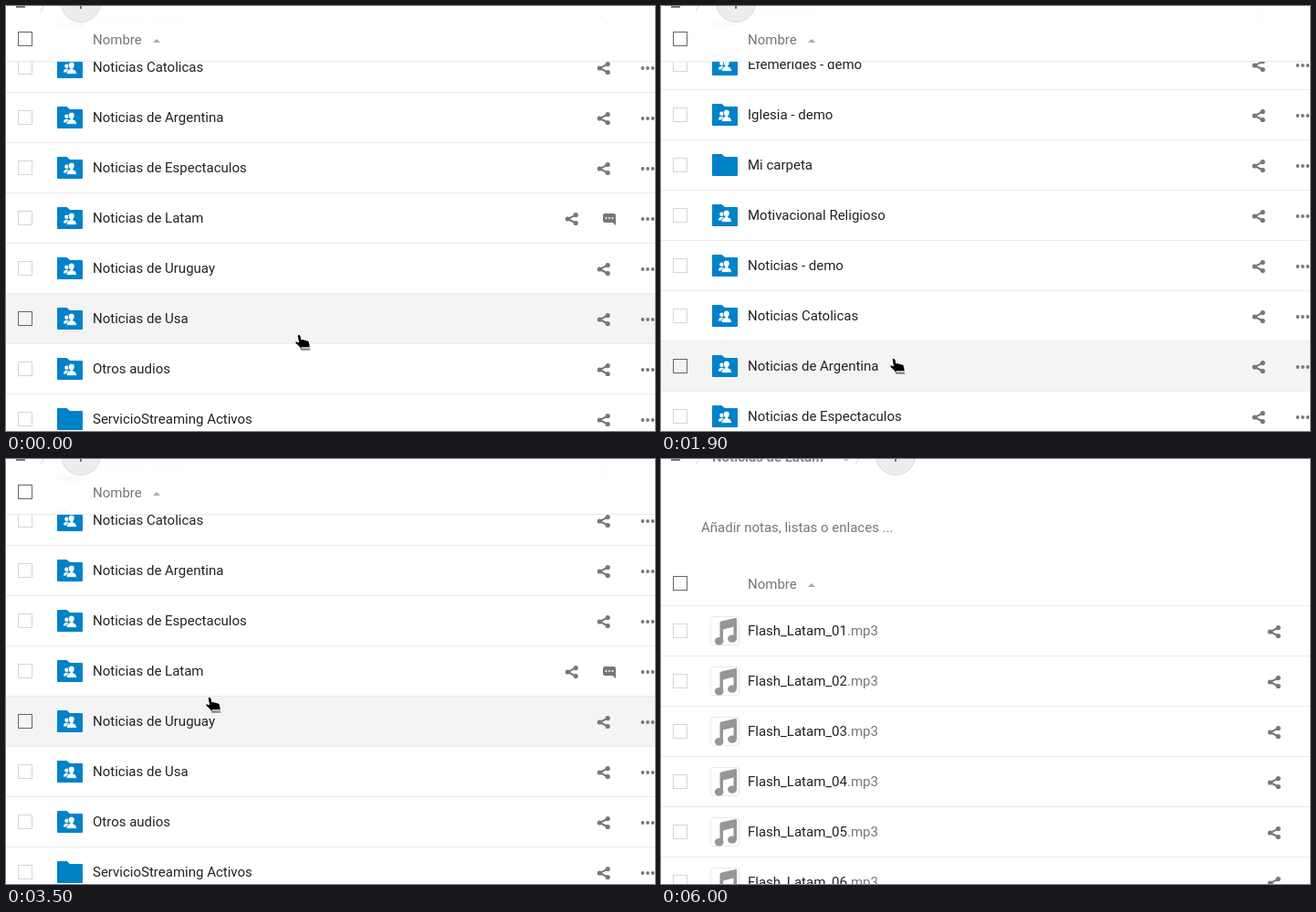
An HTML page that plays this animation: 711x465 px, repeating every 6.5 s.

```html
<!DOCTYPE html>
<html lang="es">
<head>
<meta charset="utf-8">
<title>Lista de archivos</title>
<style>
  html, body { margin: 0; width: 100%; height: 100%; overflow: hidden; background: #fff; }
  svg { display: block; }
  text { font: 15px Roboto, Arial, sans-serif; fill: #222; white-space: pre; }
  .soft { fill: #767676; }
  .crumb { font-weight: bold; fill: #888; }
  .icon { fill: #777; }
  .line { fill: #ebebeb; }
  .box { fill: #fff; stroke: #d6d6d6; }
  .row .back { fill: none; }
  .row.on .back { fill: #f4f4f4; }
  .row.on .box, .head .box { stroke: #666; }
  .row.on .box { fill: none; }
</style>
</head>
<body>
<svg width="711" height="465" viewBox="0 0 711 465">
  <defs>
    <path id="folder" fill="#0082c9" d="M57-12H66.500L70-9H83Q84-9 84-8V11Q84 12 83 12H57Q56 12 56 11V-11Q56-12 57-12Z"/>
    <g id="people">
      <circle cx="66.500" cy="-1.200" r="2.300" fill="#fff"/>
      <path fill="#fff" d="M63 5.500Q63 1.800 66.500 1.800T70 5.500Z"/>
      <path fill="#fff" stroke="#0082c9" stroke-width=".8" d="M66.300 7.400Q66 3 70.300 2C66.800-2 68.500-5.800 71.800-5.800S76.500-2 73.300 2Q77.600 3 77.300 7.400Z"/>
    </g>
    <g id="share" class="icon">
      <path d="M4.200-4.400L-4.700 0L4.200 4.500" fill="none" stroke="#777" stroke-width="2"/>
      <circle cx="-4.700" r="2.600"/><circle cx="4.200" cy="-4.400" r="2.600"/><circle cx="4.200" cy="4.500" r="2.600"/>
    </g>
    <g id="more" class="icon">
      <circle cx="697.500" cy="1" r="1.900"/><circle cx="703" cy="1" r="1.900"/><circle cx="708.500" cy="1" r="1.900"/>
    </g>
    <g id="comment">
      <path class="icon" d="M656-5H666Q668-5 668-3V8L664.500 5H656Q654 5 654 3V-3Q654-5 656-5Z"/>
      <g fill="#fff"><circle cx="657.500" r="1"/><circle cx="661" r="1"/><circle cx="664.500" r="1"/></g>
    </g>
    <g id="note">
      <rect x="54.500" y="-15.500" width="31" height="31" rx="2.500" fill="#fff" stroke="#e9e9e9"/>
      <path fill="#969696" d="M64.500-8.500Q64.500-10 66-10.500L81.500-14Q83-14.300 83-13V8.500H79.500V-4.500L68-1.500V11.500H64.500Z"/>
      <ellipse cx="63.700" cy="11.300" rx="4.800" ry="4.200" fill="#969696"/>
      <ellipse cx="78" cy="8.600" rx="5" ry="4.200" fill="#969696"/>
    </g>
    <g id="head" class="head">
      <rect class="box" x="13.500" y="-8.500" width="15" height="15"/>
      <text class="soft" x="95" y="5">Nombre</text>
      <path fill="#aaa" d="M161 3L165-1L169 3Z"/>
      <rect class="line" y="23" width="711" height="1"/>
    </g>
    <g id="home">
      <rect x="11" y="0" width="10" height="2" fill="#777"/>
      <path d="M38 6L43-3" stroke="#d4d4d4"/>
    </g>
    <g id="add">
      <circle cy="-4" r="21.500" fill="#ededed" stroke="#d9d9d9"/>
      <rect x="-1" y="-4" width="2" height="7" fill="#777"/>
    </g>
    <g id="ring" fill="none" stroke-width="2">
      <circle r="15" stroke="#ccc"/><path d="M0-15A15 15 0 0 1 15 0" stroke="#555"/>
    </g>
  </defs>

  <g id="folders">
    <g id="list"></g>
    <rect width="711" height="60" fill="#fff" opacity=".97"/>
    <rect width="711" height="18" fill="#fff" opacity=".6"/>
    <use href="#home"/>
    <use href="#add" x="82"/>
    <use href="#head" y="37"/>
  </g>

  <g id="inside">
    <use href="#home"/>
    <text class="crumb" x="56" y="3">Noticias de Latam</text>
    <circle id="crumbShare" cx="203" cy="0" r="2.500" fill="#ccc"/>
    <g id="tail"><path d="M-44 6L-39-3" stroke="#d4d4d4"/><use href="#add"/></g>
    <text id="memo" class="soft" x="44" y="80">Añadir notas, listas o enlaces ...</text>
    <g id="files"><use href="#head" y="137"/><g id="tracks"></g></g>
    <use id="ringA" href="#ring"/>
    <use id="ringB" href="#ring" opacity=".7"/>
  </g>

  <g id="hand" stroke-linejoin="round">
    <path d="M4.500.500Q6.500.200 7 2.500L7.700 6Q9.500 5 10.500 6.300Q12.300 5.500 13.200 7Q15 6.500 16 8.200L17 12V17H7L5.500 14L1 10Q0 8.300 2 7.800L4.500 8.800L3.300 2.500Q3 .900 4.500.500Z" fill="#000" stroke="#fff"/>
    <path d="M7.500 15H16.500" stroke="#fff" stroke-width="1.500"/>
    <path d="M7 17.300H17.500" stroke="#777" stroke-width=".8"/>
  </g>
  <path id="arrow" d="M0 0V16L3.700 12.700L6.200 18L8.800 16.800L6.400 11.500H11.500Z" fill="#000" stroke="#fff" stroke-width=".9"/>
</svg>

<script>
const LOOP = 6500, STEP = 100, PITCH = 55, FIRST_FILE = 188;
const OPEN = 3800, LOADED = 4300, READY = 4400;
const $ = id => document.getElementById(id);

const names = ['Devocional', 'Efemerides - demo', 'Iglesia - demo', 'Mi carpeta',
  'Motivacional Religioso', 'Noticias - demo', 'Noticias Catolicas', 'Noticias de Argentina',
  'Noticias de Espectaculos', 'Noticias de Latam', 'Noticias de Uruguay', 'Noticias de Usa',
  'Otros audios', 'ServicioStreaming Activos'];
const plain = ['Mi carpeta', 'ServicioStreaming Activos'];
const ANCHOR = names.indexOf('Noticias Catolicas');

// Key points: time, then the centre of the anchor row
const wheel = [[400, 67], [1200, 374], [1400, 339], [2200, 339], [2400, 191], [2500, 191], [2800, 67]];
// Key points: time, x, y
const path = [[400, 324, 367], [1200, 261, 217], [1500, 261, 217], [1900, 258, 393],
  [2000, 258, 393], [2300, 249, 337], [2800, 249, 332], [3000, 242, 359], [3100, 242, 359],
  [3600, 222, 245], [4600, 222, 245], [5000, 231, 184], [5300, 235, 252], [5600, 240, 356],
  [6000, 205, -40]];

function tween(keys, t, col, ease = u => u) {
  const n = keys.findIndex(k => k[0] > t);
  if (n === 0) return keys[0][col];
  if (n < 0) return keys[keys.length - 1][col];
  const a = keys[n - 1], b = keys[n];
  return Math.round(a[col] + (b[col] - a[col]) * ease((t - a[0]) / (b[0] - a[0])));
}

const scrollAt = t => tween(wheel, t, 1, u => u * u);
const pointerAt = t => [tween(path, t, 1), tween(path, t, 2)];

// The highlight lags behind while the list is scrolling
function hoverAt(t) {
  if (t >= OPEN && t < READY) return -1;
  const moving = scrollAt(t) !== scrollAt(t - STEP);
  const seen = moving ? t - 300 : t;
  const top = t < OPEN ? scrollAt(seen) - ANCHOR * PITCH : FIRST_FILE;
  return Math.round((pointerAt(seen)[1] - top) / PITCH);
}

const row = (y, body) => `<g class="row" transform="translate(0 ${y})">
  <rect class="back" y="-27" width="711" height="54"/>
  <rect class="line" y="27" width="711" height="1"/>
  <rect class="box" x="13.5" y="-7.5" width="15" height="15"/>${body}</g>`;

const folderRow = (name, i) => {
  const noted = name === 'Noticias de Latam';
  return row((i - ANCHOR) * PITCH, `<use href="#folder"/>
    ${plain.includes(name) ? '' : '<use href="#people"/>'}
    <text x="95" y="5">${name}</text>
    <use href="#share" x="${noted ? 620 : 655}" y="1"/>
    ${noted ? '<use href="#comment"/>' : ''}<use href="#more"/>`);
};

const fileRow = (_, i) => row(FIRST_FILE + i * PITCH, `<use href="#note"/>
  <text x="95" y="5">Flash_Latam_0${i + 1}<tspan class="soft">.mp3</tspan></text>
  <use href="#share" x="672" y="1"/>`);

$('list').innerHTML = names.map(folderRow).join('');
$('tracks').innerHTML = Array.from({ length: 6 }, fileRow).join('');

const show = (id, on) => $(id).style.display = on ? '' : 'none';
const move = (id, x, y, extra = '') => $(id).setAttribute('transform', `translate(${x} ${y}) ${extra}`);
const mark = (id, n) => [...$(id).children].forEach((r, i) => r.classList.toggle('on', i === n));

function draw(t) {
  const opened = t >= OPEN, loaded = t >= LOADED, ready = t >= READY;
  show('folders', !opened);
  show('inside', opened);
  show('files', loaded);
  show('crumbShare', loaded);
  show('memo', ready);
  show('ringA', !ready);
  show('ringB', !loaded);

  move('list', 0, scrollAt(t));
  move('tail', loaded ? 257 : 235, 0);
  const spin = `rotate(${(t - 4000) * 0.45})`;
  move('ringA', 476, 65, spin);
  move('ringB', 326, 435, spin);

  const hover = hoverAt(t), [x, y] = pointerAt(t);
  mark(opened ? 'tracks' : 'list', hover);
  show('hand', hover >= 0);
  show('arrow', hover < 0);
  move('hand', x - 8, y - 8);
  move('arrow', x - 1, y);
}

function tick() {
  const t = performance.now() % LOOP;
  draw(Math.floor(t / STEP) * STEP);
  requestAnimationFrame(tick);
}
tick();
</script>
</body>
</html>
```
